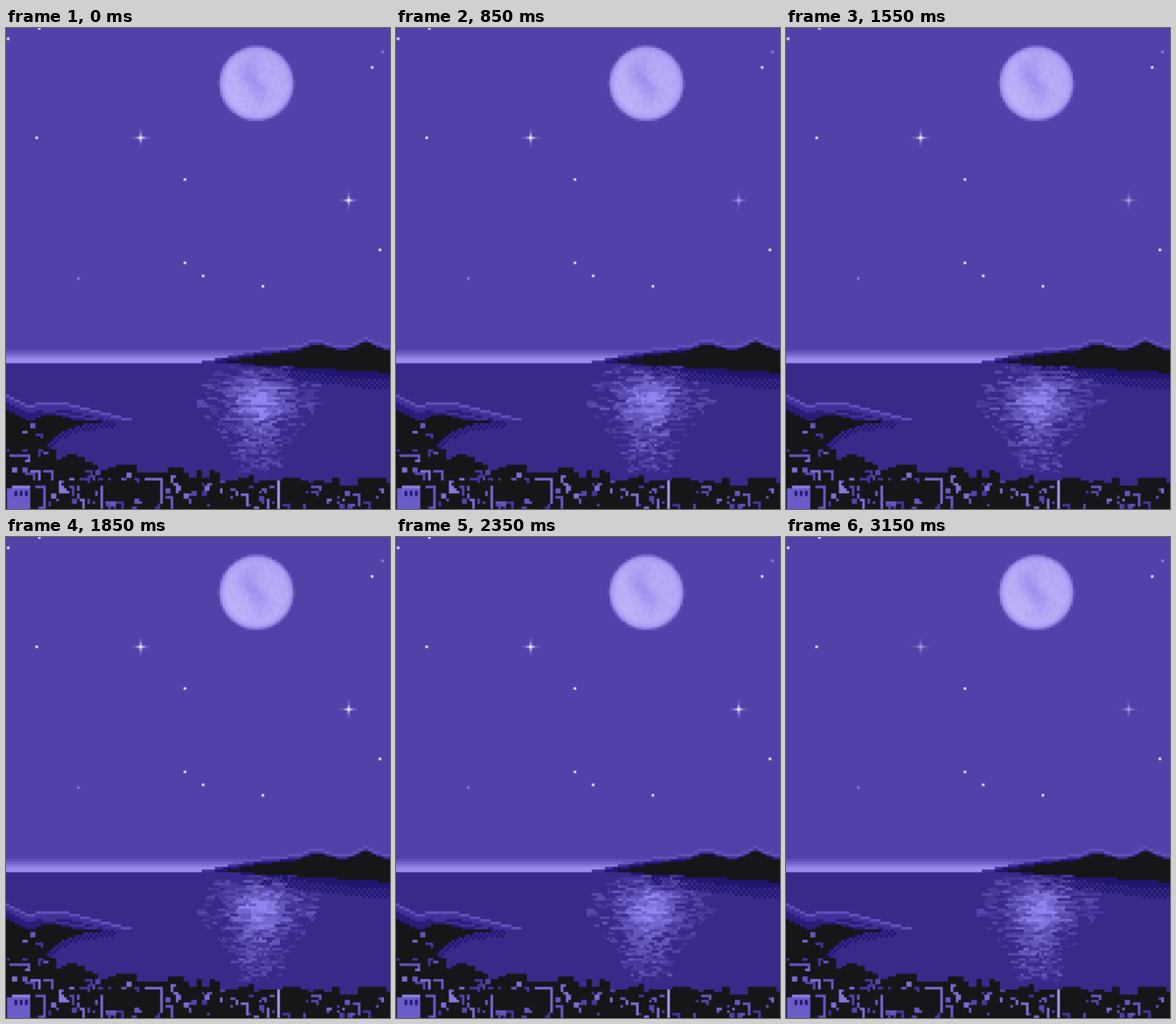
Recreate the animation shown at these times as an HTML page with a canvas. Size 480 px wide and 600 px high, loop 3250 ms.

```html
<!DOCTYPE html>
<html lang="en">
<head>
<meta charset="utf-8">
<title>Moonlit bay</title>
<style>
html, body { margin: 0; width: 100%; height: 100%; overflow: hidden; background: #5042a8; }
canvas { display: block; width: 480px; height: 600px; }
</style>
</head>
<body>
<canvas id="stage" width="480" height="600"></canvas>
<script>
const LOOP = 3250, STEP = 50, CELL = 3.25, ZOOM = 2;
const COLS = 150, ROWS = 187;
const SKY = '#5042a8', SEA = '#372a89', DEEP = '#21166f', BLACK = '#161518';
const RIDGE = '#6052b8', SLOPE = '#3f3198', LIGHT = '#9284f0';

function layer(w, h) {
  const c = document.createElement('canvas');
  c.width = w;
  c.height = h;
  return c.getContext('2d');
}

const stage = document.getElementById('stage').getContext('2d');
const still = layer(COLS, ROWS);
const scene = layer(COLS, ROWS);
const zoom = layer(COLS * ZOOM, ROWS * ZOOM);
zoom.imageSmoothingEnabled = false;
still.translate(1, 0);
scene.translate(1, 0);

let g = still;
function put(color, i, j, w = 1, h = 1, alpha = 1) {
  g.globalAlpha = alpha;
  g.fillStyle = color;
  g.fillRect(i, j, w, h);
  g.globalAlpha = 1;
}

// stage pixels <-> cells
const col = x => Math.round((x - 2.6) / CELL);
const row = y => Math.round((y - 0.4) / CELL);
const midX = i => i * CELL + 2.6;
const midY = j => j * CELL + 0.4;

const clamp = (v, a = 0, b = 1) => Math.min(b, Math.max(a, v));
const bump = (x, center, width) => Math.exp(-(((x - center) / width) ** 2));
const ease = k => { k = clamp(k); return k * k * (3 - 2 * k); };
const plus = (f, d) => x => f(x) + d;

function random(seed) {
  return () => {
    seed = (seed + 0x6D2B79F5) | 0;
    let r = Math.imul(seed ^ (seed >>> 15), 1 | seed);
    r = (r + Math.imul(r ^ (r >>> 7), 61 | r)) ^ r;
    return ((r ^ (r >>> 14)) >>> 0) / 4294967296;
  };
}

// fills the cells between two curves from x0 to x1
function band(color, top, bottom, x0, x1, dither = false) {
  for (let i = col(x0); i <= col(x1); i++) {
    const a = row(top(midX(i))), b = row(bottom(midX(i)));
    for (let j = a; j < b; j++) if (!dither || (i + j) % 2) put(color, i, j);
  }
}

function moon() {
  const rnd = random(5);
  for (let j = 5; j < 38; j++) for (let i = 80; i < 112; i++) {
    const dx = midX(i) - 313, dy = midY(j) - 69, d = Math.hypot(dx, dy);
    if (d > 47.5) continue;
    const seas = bump(dx, 8 * Math.sin(dy / 11) - 3, 13) * bump(dy, -2, 28);
    const v = 0.85 - 0.75 * seas + 0.12 * (dy - dx) / 46 + (rnd() - 0.5) * 0.3;
    put('#9d90ef', i, j, 1, 1, clamp((48.5 - d) / 5));
    put('#bdb3f8', i, j, 1, 1, clamp(v) * clamp((47 - d) / 10));
  }
}

function sky() {
  put(SKY, -1, 0, COLS, ROWS);
  const stars = [[38, 137], [223, 189], [223, 293], [246, 309], [320, 322], [467, 277], [458, 49], [42, 1], [1, 14]];
  for (const [x, y] of stars) put('#e0dbfa', col(x), row(y));
  for (const [x, y] of [[90, 313], [471, 30]]) put('#867acf', col(x), row(y));
  moon();
}

function farShore() {
  for (let k = 0; k < 5; k++) put('#9c8ef2', -1, 124 + k, 105 - k * 5, 1, clamp(0.22 + k * 0.24));
  put(SEA, -1, 129, COLS, 60);

  const rise = x => clamp((x - 235) / 165);
  const ridge = x => 397 + 20 * (1 - rise(x)) ** 2 - 7 * bump(x, 388, 16) - 9 * bump(x, 450, 14);
  const water = () => 419;
  const foot = x => 419 + 13 * clamp((x - 275) / 205);
  const shade = x => 421 + 19 * clamp((x - 290) / 160);

  band(RIDGE, ridge, water, 285, 482);
  band(SLOPE, plus(ridge, 3.25), water, 235, 482);
  band(DEEP, plus(ridge, 5.5), water, 262, 482);
  band(DEEP, water, shade, 275, 482);
  band(DEEP, shade, plus(shade, 11), 320, 482, true);
  band(BLACK, x => ridge(x) + 11 - 5 * rise(x), foot, 275, 482);
}

const shore = x => 490 + 38 * Math.exp((45 - x) / 28);
const roofs = x => 547 + 20 * ease((x - 120) / 260) - 40 * bump(x, 0, 65);

// a slope fading from its lit ridge down to black
function hillside(ridge, floor, x0, x1) {
  [RIDGE, SLOPE, '#291d7a', BLACK].forEach((c, k) => band(c, plus(ridge, k * (k + 1) * 1.6), floor, x0, x1));
}

function nearShore() {
  const land = x => 492 - 6 * Math.exp(-x / 20);
  const back = x => 459 + 0.46 * x;
  const front = x => 467 + 0.25 * Math.max(0, x - 68) + 0.45 * Math.max(0, 45 - x);
  const fold = x => 475 + 0.19 * (x - 38);

  band(DEEP, shore, plus(shore, 9), 45, 136, true);
  hillside(back, land, -2, 70);
  hillside(front, land, 33, 158);
  band(SLOPE, fold, plus(fold, 3.25), 38, 115);
  band(BLACK, land, shore, 44, 158);
  band(BLACK, land, () => 605, -2, 44);
}

// a roof line and one lit wall on a dark block
function house(x, y, w, h, color) {
  const i = col(x), j = row(y);
  put(BLACK, i - 1, j, w + 2, h);
  put(color, i, j, w);
  put(color, i + w - 1, j, 1, h);
}

function city() {
  const rnd = random(21);
  const pick = (a, b) => a + Math.floor(rnd() * (b - a + 1));
  const tones = ['#4335a0', '#5446ae', '#6557c0', '#7c6fd2'];
  const tone = () => tones[pick(0, 3)];

  for (let i = -1; i < 149;) {
    const w = pick(2, 4), top = row(roofs(midX(i))) + pick(-1, 2);
    put(BLACK, i, top, w, ROWS - top);
    i += w;
  }

  for (let k = 0; k < 115; k++) {
    const x = 480 * rnd() ** 1.35;
    const top = x < 48 ? 495 : roofs(x) + 5;
    const y = top + rnd() * (600 - top), kind = rnd();
    if (kind < 0.75) put(tone(), col(x), row(y), pick(1, 2), pick(1, 2));
    else house(x, y, pick(2, 4), pick(2, 5), tone());
  }

  // white block with windows
  const [bx, by] = [col(1), row(575)];
  put(BLACK, bx, by - 3, 11, 12);
  put('#6a5cc6', bx, by, 9, 9);
  put('#8e82e0', bx + 2, by - 1, 7);
  for (let k = 0; k < 3; k++) put(DEEP, bx + 3 + 2 * k, by + 1, 1, 2);

  // dome, widening downwards
  for (let k = 0; k < 5; k++) put('#8478da', col(69), row(565) + k, 1 + Math.floor(k * 0.8));

  house(175, 562, 7, 10, '#7568d0');
  house(38, 574, 4, 8, '#6557c0');
  house(5, 532, 8, 2, '#6557c0');
  house(200, 584, 3, 5, '#6557c0');
  house(118, 571, 1, 9, '#7568d0');
  house(341, 567, 1, 11, '#a59ae8');
}

// glints of moonlight, each with its own whole number of cycles per loop
function makeGlints() {
  const rnd = random(77), out = [];
  for (let j = 130; j <= 170; j++) {
    const y = midY(j);
    const half = 26 + 50 * bump(y, 464, 46);
    for (let i = col(316 - half); i < col(316 + half);) {
      const len = 1 + Math.floor(rnd() * (y < 500 ? 4 : 3));
      const dx = midX(i + (len - 1) / 2) - 316;
      const core = 0.78 * bump(y, 462, 26) * bump(dx, 0, 40);
      const tail = 0.4 * bump(y, 500, 52) * bump(dx, 0, 24);
      out.push({
        i, j, len,
        base: core + tail + (rnd() - 0.5) * 0.5 - (j % 2) * 0.06,
        turns: 3 + Math.floor(rnd() * 5),
        phase: rnd()
      });
      i += len;
    }
  }
  return out;
}

const glints = makeGlints();

function drawGlints(t) {
  for (const p of glints) {
    const v = p.base + 0.16 * Math.sin(2 * Math.PI * (p.turns * t / LOOP + p.phase));
    const level = Math.round(clamp(v) * 6) / 6;
    if (level > 0) put(LIGHT, p.i, p.j, p.len, 1, level);
  }
}

function drawStar(i, j, bright) {
  const power = bright ? 1 : 0.6;
  for (let k = 1; k <= 3; k++) {
    const glow = power * 0.85 / k ** 1.5;
    put('#b4a9f4', i - k, j, 1, 1, glow);
    put('#b4a9f4', i + k, j, 1, 1, glow);
    put('#b4a9f4', i, j - k, 1, 1, glow);
    put('#b4a9f4', i, j + k, 1, 1, glow);
  }
  put(bright ? '#f6f4ff' : '#a99eee', i, j);
}

const within = (t, a, b) => t >= a && t < b;

function draw(time) {
  const t = Math.floor(time / STEP) * STEP % LOOP;
  g = scene;
  g.drawImage(still.canvas, -1, 0);
  drawGlints(t);
  drawStar(51, 42, !within(t, 950, 1150) && t < 3000);
  drawStar(131, 66, !within(t, 700, 1600) && t < 2650);

  zoom.drawImage(scene.canvas, 0, 0, COLS * ZOOM, ROWS * ZOOM);
  stage.drawImage(zoom.canvas, 1 - CELL, -1.2, COLS * CELL, ROWS * CELL);
}

sky();
farShore();
nearShore();
city();

const start = performance.now();
function tick() {
  draw(performance.now() - start);
  requestAnimationFrame(tick);
}
tick();
</script>
</body>
</html>
```
